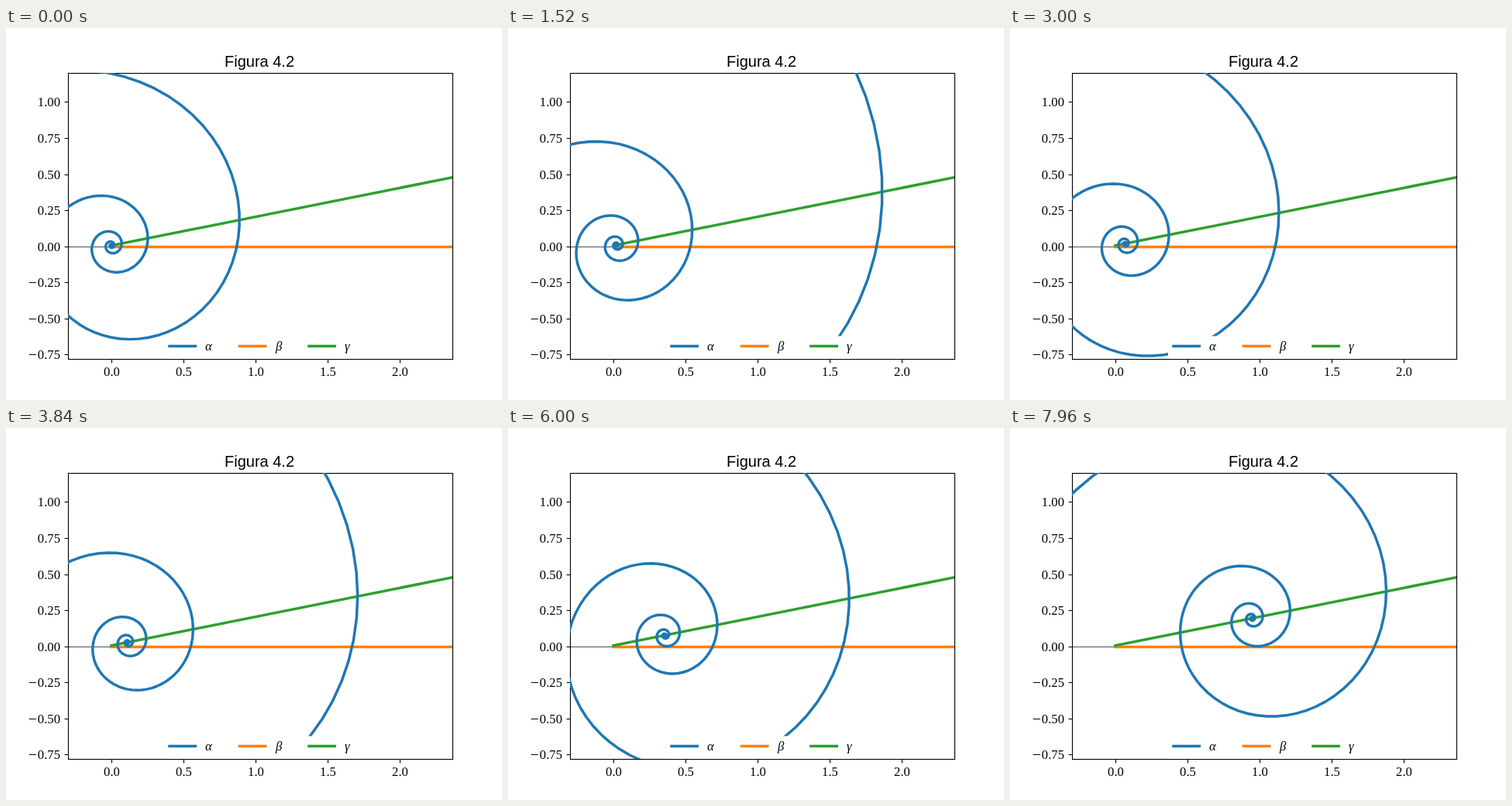
Write an HTML page that moves like this. It is 640 px wide and 480 px high and loops after 8 s.

```html
<!DOCTYPE html>
<html lang="es">
<head>
<meta charset="utf-8">
<title>Figura 4.2</title>
<style>
  html, body { margin: 0; width: 100%; height: 100%; overflow: hidden; background: #fff; }
  svg { display: block; width: 640px; height: 480px; }
  text { font: 16.67px "Liberation Serif", "Noto Serif", serif; fill: #000; }
  .title { font: 20px "Liberation Sans", Arial, sans-serif; text-anchor: middle; }
  .greek { font-style: italic; }
  .minus { font-size: 20px; }
  .curve { fill: none; stroke-width: 3.47; stroke-linecap: square; stroke-linejoin: round; }
  .alpha { stroke: #1f77b4; }
  .beta { stroke: #ff7f0e; }
  .gamma { stroke: #2ca02c; }
  .axis { fill: none; stroke: #000; stroke-width: 1.11; }
</style>
</head>
<body>
<svg viewBox="0 0 640 480">
  <defs><clipPath id="plot"><rect x="80" y="58" width="496" height="369"/></clipPath></defs>
  <g clip-path="url(#plot)">
    <path d="M80 282.5H576" fill="none" stroke="#000" stroke-width=".69"/>
    <path class="curve beta" d="M136 282.5H600"/>
    <path class="curve gamma" id="poleTrack"/>
  </g>
  <rect class="axis" x="80.5" y="58.5" width="496" height="369"/>
  <g id="ticks"></g>
  <g clip-path="url(#plot)"><path class="curve alpha" id="spiral"/></g>
  <rect x="204" y="397.5" width="248.5" height="29.5" rx="3.3" fill="#fff"/>
  <g id="legend"></g>
  <text class="title" x="327" y="50">Figura 4.2</text>
</svg>
<script>
const SCALE = 186.2, X0 = 136, Y0 = 281.6;
const GROWTH = 0.2;                    // r = R0 * exp(GROWTH * angle)
const STEP = 0.0959;                   // radians rolled per frame
const R0 = 0.8085;                     // innermost radius in pixels
const FRAME_MS = 40, FRAMES = 200;
const PSI = Math.atan(1 / GROWTH);     // angle between radius and tangent

const byId = id => document.getElementById(id);
const radius = k => R0 * Math.exp(GROWTH * STEP * k);
const snap = v => Math.floor(v + 0.5) + 0.5;

function add(parent, name, attrs, text = "") {
  const node = document.createElementNS("http://www.w3.org/2000/svg", name);
  for (const key in attrs) node.setAttribute(key, attrs[key]);
  node.textContent = text;
  return parent.appendChild(node);
}

// Where the pole sits when the spiral touches the base line at vertex n.
function pole(n) {
  const r = radius(n);
  return {
    x: X0 + (r - R0) / Math.cos(PSI) - r * Math.cos(PSI),
    y: Y0 - r * Math.sin(PSI)
  };
}

function spiralPath(n) {
  const { x, y } = pole(n);
  const points = [];
  for (let k = 0; radius(k) < 1400; k++) {
    const r = radius(k), angle = (k - n) * STEP - PSI;
    points.push((x + r * Math.cos(angle)).toFixed(2) + " " + (y - r * Math.sin(angle)).toFixed(2));
  }
  return "M" + points.join("L");
}

function drawTicks() {
  const ticks = byId("ticks");
  for (let i = 0; i <= 4; i++) {
    const x = snap(X0 + i * 0.5 * SCALE);
    add(ticks, "path", { class: "axis", d: `M${x} 427.5v4.9` });
    add(ticks, "text", { x, y: 449, "text-anchor": "middle" }, (i * 0.5).toFixed(1));
  }
  for (let i = -3; i <= 4; i++) {
    const y = snap(Y0 - i * 0.25 * SCALE);
    add(ticks, "path", { class: "axis", d: `M80.5 ${y}h-4.9` });
    add(ticks, "text", { x: 70, y: y + 5.5, "text-anchor": "end" }, Math.abs(i * 0.25).toFixed(2));
    if (i < 0) add(ticks, "text", { class: "minus", x: 40, y: y + 6, "text-anchor": "end" }, "−");
  }
}

function drawLegend() {
  const legend = byId("legend");
  [["alpha", "α", 211, 257], ["beta", "β", 301.5, 348], ["gamma", "γ", 391, 437]]
    .forEach(([name, letter, lineX, textX]) => {
      add(legend, "path", { class: "curve " + name, d: `M${lineX} 410.5h33.3` });
      add(legend, "text", { class: "greek", x: textX, y: 416 }, letter);
    });
}

drawTicks();
drawLegend();
const first = pole(0);
byId("poleTrack").setAttribute("d", `M${first.x} ${first.y}l480 ${-480 * GROWTH}`);

const spiral = byId("spiral");
const start = performance.now();
let shown = -1;
function render(now) {
  const n = Math.floor(Math.max(0, now - start) / FRAME_MS) % FRAMES;
  if (n !== shown) spiral.setAttribute("d", spiralPath(shown = n));
  requestAnimationFrame(render);
}
render(start);
</script>
</body>
</html>
```
